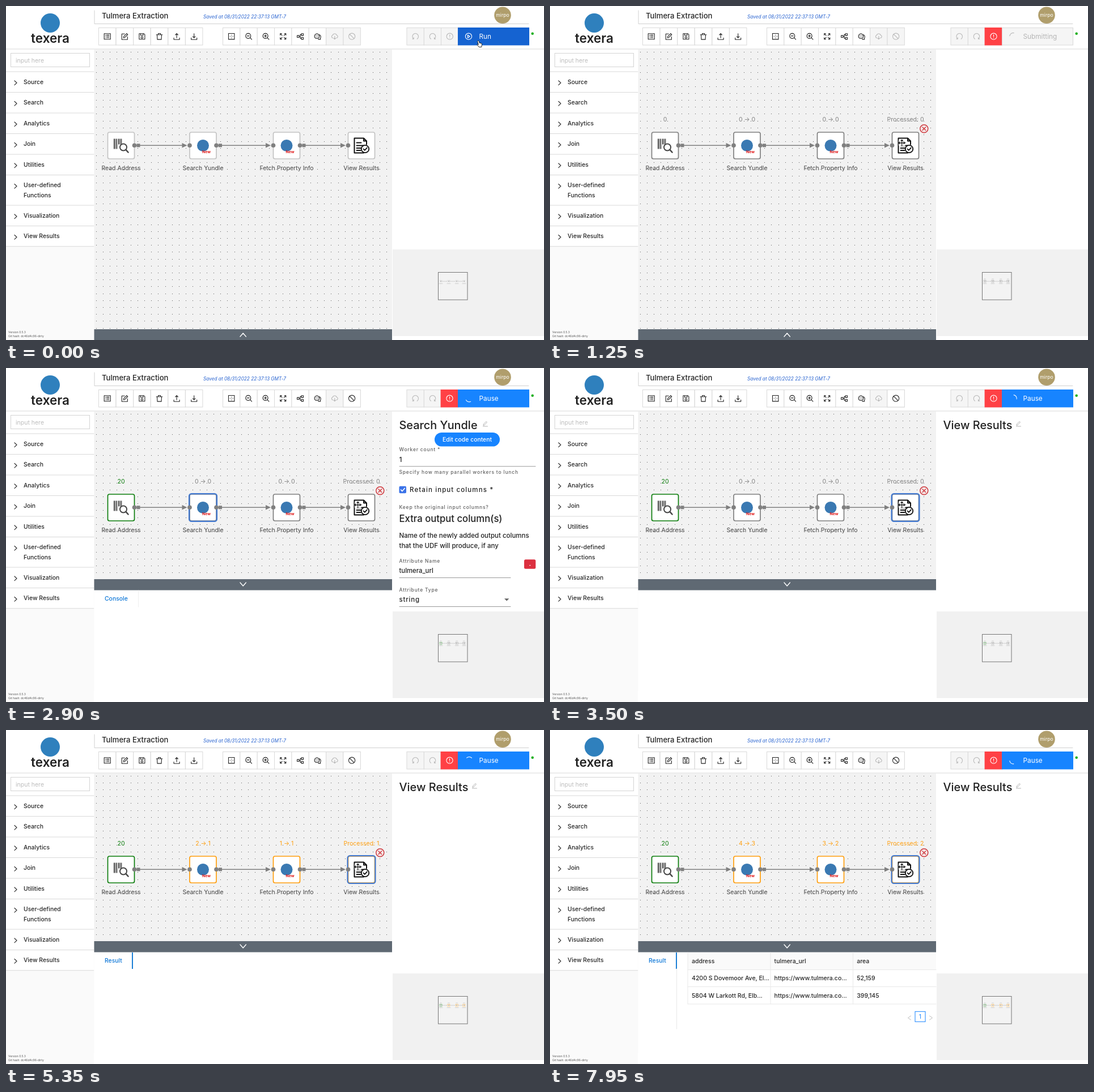
An HTML page for the animation above (8 s loop, 949x590 px).

```html
<!DOCTYPE html>
<html lang="en">
<head>
<meta charset="utf-8">
<title>Workflow editor</title>
<style>
  html, body { margin: 0; width: 100%; height: 100%; overflow: hidden; background: #fff; }
  svg { display: block; width: 949px; height: 590px; }
  text { font-family: Inter, "Open Sans", sans-serif; font-size: 10.5px; fill: #262626; white-space: pre; }
  .mid { text-anchor: middle; }
  .medium text { font-weight: 500; }
  .field { font-size: 8.5px; letter-spacing: .8px; fill: #606060; }
  .line { fill: none; stroke-linecap: round; stroke-linejoin: round; }
</style>
</head>
<body>
<svg id="stage" viewBox="0 0 949 590"></svg>
<script>
const LOOP = 8000;
const SUBMIT = 250, STATS = 400, RUNNING = 1750, OPEN = 1900, KILLABLE = 2600,
      READ = 2700, RESULTS = 3000, FIRST = 4500, SECOND = 7300;
const BLUE = '#1784ff', GREY = '#808080', GREEN = '#0c7d0c', ORANGE = '#ff9f0f';

const rect = (x, y, w, h, fill, more = '') =>
  `<rect x="${x}" y="${y}" width="${w}" height="${h}" fill="${fill}" ${more}/>`;
const circle = (x, y, r, fill, more = '') => `<circle cx="${x}" cy="${y}" r="${r}" fill="${fill}" ${more}/>`;
const line = (d, color, width = 1, more = '') =>
  `<path class="line" d="${d}" stroke="${color}" stroke-width="${width}" ${more}/>`;
const text = (x, y, s, more = '') => `<text x="${x}" y="${y}" ${more}>${s}</text>`;
const style = (size, color = '#262626', more = '') => `style="font-size:${size}px;fill:${color};${more}"`;
const at = (x, y, s) => `<g transform="translate(${x} ${y})">${s}</g>`;
const medium = s => `<g class="medium">${s}</g>`;
const during = (from, to, s) => `<g data-from="${from}" data-to="${to}">${s}</g>`;
const ring = r => `M${-r} 0a${r} ${r} 0 1 0 ${2 * r} 0a${r} ${r} 0 1 0 ${-2 * r} 0`;

const icons = {
  list: 'M-5.5-5h11v10h-11zM-3-2.3h.3M-1-2.3h4M-3 0h.3M-1 0h4M-3 2.3h.3M-1 2.3h4',
  edit: 'M0-4.5h-5v10h10v-5M-2 2.4l.4-2.2 5.2-5.2 1.8 1.8-5.2 5.2z',
  save: 'M-5-5h8l2 2v8h-10zM-2.5-5v3h4.5v-3M-1.7 1.8a1.7 1.7 0 1 0 3.4 0a1.7 1.7 0 1 0-3.4 0',
  trash: 'M-5.3-3h10.6M-2-3v-2.2h4v2.2M-4-3l.5 8.4h7l.5-8.4',
  upload: 'M-5 2.5v3h10v-3M0 2.5v-7.5M-2.3-2.7l2.3-2.3 2.3 2.3',
  download: 'M-5 2.5v3h10v-3M0-5v7.5M-2.3.2l2.3 2.3 2.3-2.3',
  region: 'M-5.2-5.2h10.4v10.4h-10.4zM-2.5 0h.2M0 0h.2M2.5 0h.2M0-2.5h.2M0 2.5h.2',
  zoomOut: 'M-5.3-.8a4.5 4.5 0 1 0 9 0a4.5 4.5 0 1 0-9 0M2.5 2.5l3 3M-2.8-.8h4',
  zoomIn: 'M-5.3-.8a4.5 4.5 0 1 0 9 0a4.5 4.5 0 1 0-9 0M2.5 2.5l3 3M-2.8-.8h4M-.8-2.8v4',
  expand: 'M-5-2.2v-2.8h2.8M-5-5l3.4 3.4M5-2.2v-2.8h-2.8M5-5l-3.4 3.4M-5 2.2v2.8h2.8M-5 5l3.4-3.4M5 2.2v2.8h-2.8M5 5l-3.4-3.4',
  cluster: 'M-5.5-1.6h3.4v3.4h-3.4zM2-5h3.4v3.4h-3.4zM2 1.8h3.4v3.4h-3.4zM-2 0h2M2-3.3h-2v6.8h2',
  chat: 'M-3.5 3.2a4.3 4.3 0 1 1 5 0h-5zM3.5-3a4.2 4.2 0 0 1 1.7 6v2.2h-4M-3-.8h.2M-1-.8h.2M1-.8h.2',
  cloud: 'M-3 2.8h-.5a2.6 2.6 0 0 1 0-5a3.7 3.7 0 0 1 7 0a2.6 2.6 0 0 1 0 5h-.5M0-.5v5.4M-1.7 3.3l1.7 1.7 1.7-1.7',
  ban: ring(5.6) + 'M-3.9-3.9l7.8 7.8',
  undo: 'M-3 4.5a5.3 5.3 0 1 1 6 0M-3 4.5v-2.3M-3 4.5h-2.2',
  redo: 'M3 4.5a5.3 5.3 0 1 0-6 0M3 4.5v-2.3M3 4.5h2.2',
  alert: ring(5.6) + 'M0-3v3.4M0 2.6v.2',
  play: ring(5.6) + 'M-1.6-2.6v5.2l3.8-2.6z',
  pencil: 'M-3.5 4h8M-3 2l.5-2 4.5-4.5 1.5 1.5-4.5 4.5z'
};
const icon = (name, x, y, color = '#222', width = 1.1) => at(x, y, line(icons[name], color, width));
const button = (name, x, off) =>
  rect(x, 38.5, 30.4, 30.5, off ? '#f5f5f5' : '#fff', 'stroke="#d9d9d9"') +
  icon(name, x + 15.2, 53.7, off ? '#b8b8b8' : '#222');

function sidebar() {
  const rows = [['Source', 116], ['Search', 152.5], ['Analytics', 189], ['Join', 225.5], ['Utilities', 262],
                ['User-defined', 298.5], ['Visualization', 352], ['View Results', 388.5]];
  const label = (y, s) => text(31, y, s, style(10.4));
  return rect(0, 425, 155, 165, '#fafafa') +
    circle(78, 30, 17, '#2f80bd') +
    text(78, 65, 'texera', 'class="mid" ' + style(22.5, '#222', 'font-weight:600')) +
    rect(8.5, 83.5, 139, 24, '#fff', 'stroke="#d4d4d4"') + text(17, 99.5, 'input here', style(10.5, '#bdbdbd')) +
    medium(rows.map(([name, y]) => line(`M0 ${y}h155`, '#d9d9d9') + label(y + 21.7, name) +
      line(`M15 ${y + 16}l4 3.8-4 3.8`, '#333', 1.2)).join('') + label(337.5, 'Functions')) +
    line('M0 424.7h155', '#d9d9d9') +
    text(4, 577.5, 'Version 0.5.3', style(5, '#555')) +
    text(4, 584.5, 'Git hash: dc46d4c96-dirty', style(5, '#555'));
}

function header() {
  const label = (s, color) => text(834.5, 58.2, s, style(11.8, color));
  const run = (fill, more) => rect(797.5, 38.5, 125, 30.5, fill, more || `stroke="${fill}"`);
  const left = ['list', 'edit', 'save', 'trash', 'upload', 'download'];
  const middle = ['region', 'zoomOut', 'zoomIn', 'expand', 'cluster', 'chat', 'cloud', 'ban'];
  return line('M0 76h949', '#d9d9d9') + line('M156 8v23.5h766', '#d0d0d0') +
    medium(text(169, 21.7, 'Tulmera Extraction', style(13.1))) +
    text(348, 21.7, 'Saved at 08/31/2022 22:37:13 GMT-7', style(8.25, '#2460cf', 'font-style:italic')) +
    circle(876, 16.3, 14.8, '#b09e6c') + text(876, 19.2, 'mirpo', 'class="mid" ' + style(8.6, '#fff')) +
    left.map((n, i) => button(n, 163.5 + i * 30.6)).join('') +
    middle.map((n, i) => button(n, 382.5 + i * 30.35, i > 5)).join('') +
    during(KILLABLE, LOOP, button('ban', 594.9)) +
    ['undo', 'redo', 'alert'].map((n, i) => button(n, 707 + i * 30.3, true)).join('') +
    during(SUBMIT, LOOP, rect(766.6, 38, 31, 31.5, '#ff4145') + icon('alert', 782.5, 53.7, '#fff')) +
    during(0, SUBMIT, run('#1563d1') + icon('play', 816, 53.7, '#fff') + label('Run', '#fff')) +
    during(SUBMIT, RUNNING, run('#f5f5f5', 'stroke="#d9d9d9"') + label('Submitting', '#b5b5b5')) +
    during(RUNNING, LOOP, run(BLUE) + label('Pause', '#fff')) +
    during(SUBMIT, LOOP, line('M817 47.5a6.2 6.2 0 0 1 6.2 6.2', '#fff', 1.1, 'id="spinner"')) +
    circle(928.7, 48.8, 2.3, '#1cb01c');
}

const glyphs = {
  read: [0, 3, 5, 8, 11, 13].map((x, i) => rect(x - 13, -12, i % 3 ? 1.3 : 2, i < 3 ? 18 : 10, '#444')).join('') +
    circle(4, 3, 6, '#fff', 'stroke="#444" stroke-width="2"') + line('M8.5 7.5l4 4.5', '#444', 2.5),
  udf: circle(0, 0, 10.5, '#3a79b2') + text(6, 13.5, 'New', 'class="mid" ' + style(6.8, '#e01818', 'font-weight:700')),
  view: line('M4-13h-16.5v26h16.5M4-13l5 5v6M4-13v5h5M-8.5-5h8M-8.5 0h12M-8.5 4.5h8M-8.5 8.5h7', '#111', 2) +
    circle(6.5, 6, 6.7, '#fff', 'stroke="#111" stroke-width="1.8"') + line('M3.5 6l2.3 2.4 4-4.5', '#111', 1.8) +
    during(STATS, LOOP, rect(-12, -10, 11.5, 10.5, '#fff') +
      line('M-11.5-4.7h10.5M-6.3-10v10.4M-8-8.5l1.7-1.7 1.7 1.7M-10-6.5l-1.7 1.8 1.7 1.8M-3-6.5l1.8 1.8-1.8 1.8', '#111', 1.2))
};

// Each state: start time, caption, colour
const operators = [
  { x: 203, name: 'Read Address', glyph: 'read',
    states: [[0, '', '#c4c4c4'], [STATS, '0', GREY], [READ, '20', GREEN]] },
  { x: 347.5, name: 'Search Yundle', glyph: 'udf', selected: [OPEN, RESULTS],
    states: [[0, '', '#c4c4c4'], [STATS, '0 → 0', GREY], [FIRST, '2 → 1', ORANGE], [SECOND, '4 → 3', ORANGE]] },
  { x: 495, name: 'Fetch Property Info', glyph: 'udf',
    states: [[0, '', '#c4c4c4'], [STATS, '0 → 0', GREY], [FIRST, '1 → 1', ORANGE], [SECOND, '3 → 2', ORANGE]] },
  { x: 627, name: 'View Results', glyph: 'view', selected: [RESULTS, LOOP],
    states: [[0, '', '#c4c4c4'], [STATS, 'Processed: 0', GREY], [FIRST, 'Processed: 1', ORANGE], [SECOND, 'Processed: 2', ORANGE]] }
];

function workflow() {
  const gap = 12.2;
  let dots = '';
  for (let y = 80.6; y < 571; y += gap)
    for (let x = 158.6; x < 680; x += gap) dots += `M${Math.round(x)} ${Math.round(y)}h1v1h-1z`;
  const links = operators.slice(1).map((op, i) => {
    const a = operators[i].x + 24, b = op.x - 24;
    return line(`M${a} 246.3H${b - 8}`, GREY, 1.5) + rect(a + 3.5, 243.3, 6, 6, GREY) +
      `<path d="M${b - 13} 242l9 4.3-9 4.3z" fill="${GREY}"/>`;
  }).join('');
  const boxes = operators.map((op, i) =>
    rect(op.x - 23.5, 223, 47, 47, '#fff', `rx="3" stroke-width="1.7" id="box${i}"`) +
    (op.selected ? during(...op.selected, rect(op.x - 24.4, 222.1, 48.8, 48.8, 'none', 'rx="4" stroke="#447bd2" stroke-width="2.3"')) : '') +
    at(op.x, 246.5, glyphs[op.glyph]) +
    (i ? circle(op.x - 23.5, 246.3, 3.8, GREY) : '') + (i < 3 ? circle(op.x + 23.5, 246.3, 3.8, GREY) : '') +
    text(op.x, 289.6, op.name, 'class="mid" ' + style(10.5, '#444')) +
    text(op.x, 204.3, '', `class="mid" id="caption${i}"`)).join('');
  return rect(155.5, 77, 525.5, 494, '#f2f2f2') + `<path d="${dots}" fill="#555"/>` + links + boxes +
    during(STATS, LOOP, circle(659.8, 216.8, 7, '#f4e8e8', 'stroke="#cf3b40" stroke-width="1.5"') +
      line('M657 214l5.6 5.6M662.6 214l-5.6 5.6', '#cf3b40', 1.4));
}

function minimap() {
  return rect(682, 430, 267, 153, '#f1f1f1') + rect(762.5, 470.5, 51.5, 48.5, '#f3f3f3', 'stroke="#777"') +
    line('M767 486.3h41', '#aaa', .5) +
    operators.map((op, i) => {
      const x = 767 + (op.x - 203) * .0965;
      return rect(x - 2, 484.3, 4, 4, '#fff', `stroke-width=".4" id="mini${i}"`) +
        rect(x - .6, 485.6, 1.4, 1.4, '#777') + line(`M${x - 3} 490.5h6`, '#bbb', .6) +
        during(STATS, LOOP, line(`M${x - 1.5} 482.2h3`, '#bbb', .6));
    }).join('');
}

function bottomPanel() {
  const tab = s => medium(text(174, 411.2, s, style(10.4, '#0f78d8')));
  const cells = [
    ['address', 'tulmera_url', 'area'],
    ['4200 S Dovemoor Ave, El...', 'https://www.tulmera.co...', '52,159'],
    ['5804 W Larkott Rd, Elb...', 'https://www.tulmera.co...', '399,145']];
  const table = rect(243, 393, 438, 30, '#fafafa') +
    line('M243 393v91M389 393v91M534.5 393v91M243 423.5h438M243 453.5h438M243 484h438M223.5 422v106', '#e8e8e8') +
    medium(cells.map((row, r) => row.map((s, c) => text(250 + c * 145.6, 412 + r * 30.4, s)).join('')).join('')) +
    line('M636.5 505l-5 3.5 5 3.5M669.5 505l5 3.5-5 3.5', '#bbb') +
    rect(644, 497.3, 18, 18, '#fff', `stroke="${BLUE}"`) +
    text(653, 510, '1', 'class="mid" ' + style(10.5, BLUE));
  return during(0, OPEN, rect(155.5, 571, 525.5, 19, '#5f6973') + line('M413 584l5.2-6 5.2 6', '#fff', 1.4)) +
    during(OPEN, LOOP, rect(155.5, 392, 525.5, 198, '#fff') + rect(155.5, 373, 525.5, 19.5, '#5f6973') +
      line('M413 379l5.2 6 5.2-6', '#fff', 1.4)) +
    during(OPEN, RESULTS, tab('Console') + line('M233.5 393v29', '#eee')) +
    during(FIRST, LOOP, tab('Result') + rect(222, 393, 2, 29, '#1b7fd6')) +
    during(SECOND, LOOP, table);
}

function properties() {
  const title = s => text(693.5, 108.3, s, style(19.9, '#222'));
  const field = (y, s) => text(693.5, y, s, 'class="field"');
  const value = (y, s, size, more) => text(693.5, y, s, style(size, '#222', more));
  return medium(
    during(OPEN, RESULTS, title('Search Yundle') + icon('pencil', 845, 99, '#aaa', .9) +
      rect(756, 114, 115, 24.6, BLUE, 'rx="12.3"') +
      text(813.5, 130.2, 'Edit code content', 'class="mid" ' + style(10.4, '#fff')) +
      field(147, 'Worker count *') + value(165.7, '1', 12) + line('M694 173.8h240', '#999') +
      field(187.3, 'Specify how many parallel workers to lunch') +
      rect(693.5, 208.7, 12.5, 12.5, '#3b73e8', 'rx="2"') + line('M696.5 215l2.4 2.6 4.4-5.2', '#fff', 1.6) +
      text(712, 219.2, 'Retain input columns *', style(11.5, '#222', 'letter-spacing:1.1px')) +
      field(249, 'Keep the original input columns?') +
      value(272.3, 'Extra output column(s)', 16.7) +
      value(299.5, 'Name of the newly added output columns', 11.5) +
      value(318, 'that the UDF will produce, if any', 11.5) +
      field(344, 'Attribute Name') + value(362.3, 'tulmera_url', 11.3) + line('M694 370.5h196', '#999') +
      rect(914, 338.3, 20.3, 16.5, '#dc3040', 'rx="2.5"') + rect(923.3, 348, 2, 1.2, '#fff') +
      field(395, 'Attribute Type') + value(413.3, 'string', 11.5, 'letter-spacing:.8px') +
      '<path d="M879 407.3h8.4l-4.2 4.2z" fill="#666"/>' + line('M694 421.5h196', '#999')) +
    during(RESULTS, LOOP, title('View Results') + icon('pencil', 826, 99, '#aaa', .9)));
}

const cursor = '<path d="M832.5 61.5q1.3-.6 1.7.7l.9 3 3 .6q1.7.6 1.4 2.3l-.7 4.4h-4.6l-2.9-3.8q-.5-1.3 1.1-1l1 .7-1.7-5.8q-.1-.9.8-1.1z" fill="#fff" stroke="#111" stroke-width=".9"/>';

const stage = document.getElementById('stage');
stage.innerHTML = sidebar() + header() + workflow() + minimap() + bottomPanel() + properties() + during(0, 450, cursor);

const byId = id => document.getElementById(id);
const timed = [...stage.querySelectorAll('[data-from]')];
const spinner = byId('spinner');

function render(t) {
  for (const g of timed) g.style.display = t >= +g.dataset.from && t < +g.dataset.to ? '' : 'none';
  operators.forEach((op, i) => {
    const [, caption, color] = op.states.filter(s => s[0] <= t).pop();
    byId('box' + i).setAttribute('stroke', color);
    byId('mini' + i).setAttribute('stroke', color);
    byId('caption' + i).textContent = caption;
    byId('caption' + i).style.fill = color;
  });
  spinner.setAttribute('transform', `rotate(${t * .36 + 190} 817 53.7)`);
  spinner.setAttribute('stroke', t < RUNNING ? '#b0b0b0' : '#fff');
}

const start = performance.now();
function tick() {
  render((performance.now() - start) % LOOP);
  requestAnimationFrame(tick);
}
tick();
</script>
</body>
</html>
```
